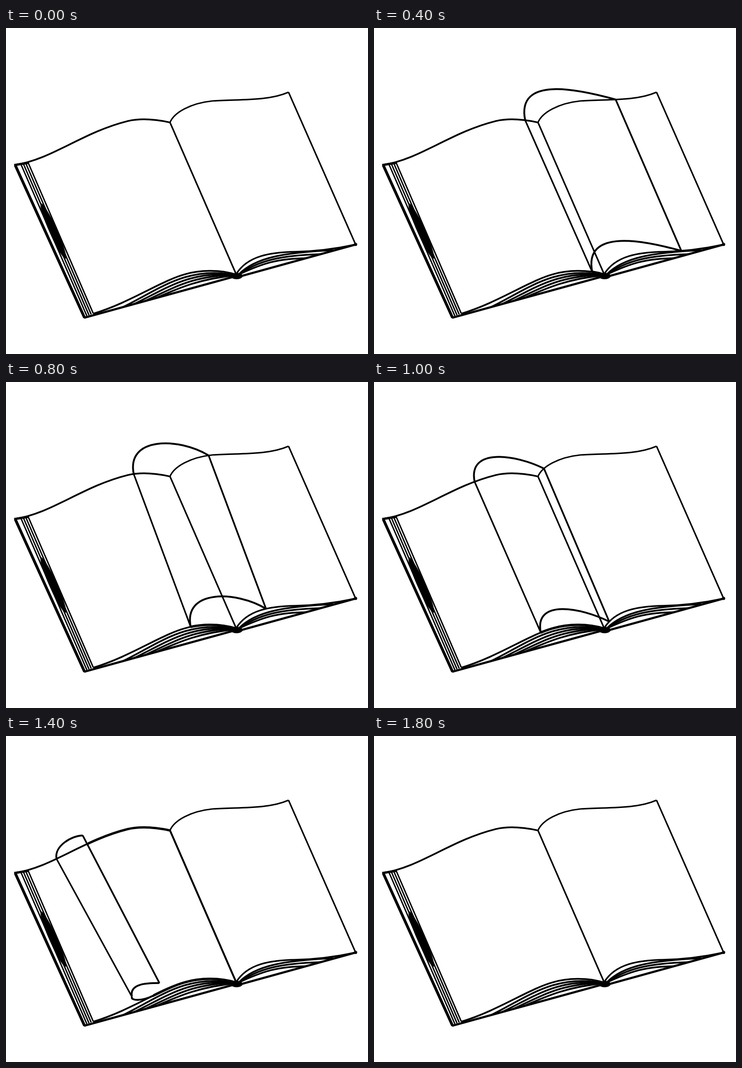
Recreate the animation shown at these times as an HTML page with a canvas. Size 788 by 711 pixels, loop 1900 ms.

```html
<!DOCTYPE html>
<html lang="en">
<head>
<meta charset="utf-8">
<title>Turning page</title>
<style>
  html, body { margin: 0; width: 100%; height: 100%; overflow: hidden; background: #fff; }
  canvas { display: block; }
</style>
</head>
<body>
<canvas id="stage" width="788" height="711"></canvas>
<script>
const ctx = document.getElementById('stage').getContext('2d');
const LOOP = 1900, STEP = 100, TURN = 1800;

// Page outlines as chained cubics: anchor, two controls, anchor, ...
const leftTop = [[18, 299], [100, 287], [165, 228], [265, 203], [295, 196], [325, 199], [357, 206]];
const rightTop = [[357, 206], [366, 184], [402, 164], [450, 159], [505, 155], [570, 160], [615, 140]];
const leftBottom = [[190, 623], [270, 599], [338, 551], [390, 537], [420, 528], [465, 526], [501, 538]];
const rightBottom = [[501, 537], [525, 497], [575, 489], [630, 488], [680, 487], [725, 480], [762, 472]];

// Horizontal travel of the fold and the free corner; heights follow the outlines.
const keyTimes = [0, 400, 800, 1000, 1200, 1400, TURN];
const topEdge = {
  left: leftTop, right: rightTop,
  fold: [357, 329, 278, 219, 157, 110, 48],
  corner: [615, 526, 441, 370, 272, 167, 48]
};
const bottomEdge = {
  left: leftBottom, right: rightBottom,
  fold: [501, 475, 402, 363, 310, 274, 190],
  corner: [762, 669, 566, 512, 417, 334, 190]
};

const clamp = v => Math.min(1, Math.max(0, v));
const shift = ([x, y], dx, dy) => [x + dx, y + dy];
const baseLeft = x => 632 - (x - 170) * 0.275;
const baseRight = x => 541 - (x - 514) * 0.278;

function track(values, t) {
  const i = keyTimes.findIndex(end => end > t) - 1;
  const u = (t - keyTimes[i]) / (keyTimes[i + 1] - keyTimes[i]);
  return values[i] + (values[i + 1] - values[i]) * u;
}

function cubic(a, b, c, d, u) {
  const v = 1 - u;
  return v * v * v * a + 3 * v * v * u * b + 3 * v * u * u * c + u * u * u * d;
}

function heightAt(curve, x) {
  const start = x < curve[3][0] ? 0 : 3;
  const axis = n => curve.slice(start, start + 4).map(p => p[n]);
  const xs = axis(0);
  let low = 0, high = 1;
  for (let i = 0; i < 20; i++) {
    const mid = (low + high) / 2;
    if (cubic(...xs, mid) < x) low = mid;
    else high = mid;
  }
  return cubic(...axis(1), low);
}

function curve(points, width) {
  ctx.beginPath();
  ctx.moveTo(...points[0]);
  for (let i = 1; i < points.length; i += 3) {
    ctx.bezierCurveTo(...points[i], ...points[i + 1], ...points[i + 2]);
  }
  ctx.lineWidth = width;
  ctx.stroke();
}

function line(a, b, width) {
  curve([a, a, b, b], width);
}

function curveRightOf(x, points, width) {
  ctx.save();
  ctx.beginPath();
  ctx.rect(x, 0, 788, 711);
  ctx.clip();
  curve(points, width);
  ctx.restore();
}

function blob(x, y, rx, ry, angle = 0) {
  ctx.beginPath();
  ctx.ellipse(x, y, rx, ry, angle, 0, 2 * Math.PI);
  ctx.fill();
}

function drawBook() {
  curve(leftTop, 3.8);
  curve(rightTop, 3.2);
  line([615, 140], [761, 472], 3.2);
  line([357, 206], [501, 537], 3.3);

  line([20, 299], [171, 632], 6);
  line([18, 299], [48, 294], 5);
  for (let k = 0; k < 4; k++) {
    line([32 + 5.3 * k, 296 - k], [176 + 4.7 * k, 628 - 1.7 * k], 3);
  }
  blob(103, 443, 66, 8.5, Math.atan2(332, 148));

  line([170, 632], [501, 541], 4.6);
  line([505, 543], [762, 472], 4.6);
  curve(leftBottom, 3.8);
  curve(rightBottom, 3.6);
  for (let k = 1; k < 5; k++) {
    const start = 230 + 24 * k, bend = 320 + 14 * k;
    curve([[start, baseLeft(start)], [bend, baseLeft(bend) - 20 + 3 * k],
      [385 + 8 * k, 508 + 10 * k], [501, 539]], 3.8);
  }
  for (let k = 1; k < 4; k++) {
    const end = 750 - 32 * k;
    curve([[506, 538], [535 + 8 * k, 492 + 7 * k], [620 - 10 * k, 482 + 7 * k],
      [end, baseRight(end)]], 3.8);
  }
  blob(502, 541, 13, 7);
  blob(761, 472, 3.5, 3.5);
}

// One edge of the turning page, from its fold over the curl to the free corner.
function edgeAt(edge, t, foldLift, cornerLift) {
  const foldX = track(edge.fold, t), cornerX = track(edge.corner, t);
  const onRight = cornerX > edge.right[0][0];
  const fold = [foldX, heightAt(edge.left, foldX) - foldLift];
  const corner = [cornerX, heightAt(onRight ? edge.right : edge.left, cornerX) - cornerLift];
  const width = cornerX - foldX;
  const rise = clamp(t / 400);
  const tilt = 40 * Math.sin(Math.PI * clamp((t - 200) / 1100));
  return [fold, shift(fold, -0.1 * width * rise, -0.5 * width * rise),
    shift(corner, -0.4 * width, -tilt), corner];
}

function drawPage(t) {
  const lift = 29 * Math.sin(Math.PI * Math.sqrt(clamp((t - 1000) / 800)));
  const top = edgeAt(topEdge, t, 0, lift);
  const bottom = edgeAt(bottomEdge, t, lift * 0.9, lift * 0.9);
  curve(top, 4);
  curve(bottom, 4);
  line(top[0], bottom[0], 3.4);
  line(top[3], bottom[3], 3.7);

  let joinX = bottom[0][0];
  if (lift > 0) {
    joinX += 2 * lift;
    curve([bottom[0], shift(bottom[0], -3, 10), shift(bottom[0], 24, 9),
      [joinX, heightAt(leftBottom, joinX)]], 4);
    line([357, 206], [501, 537], 4);
  }
  curveRightOf(joinX, leftBottom, 5.4);
  curveRightOf(top[3][0] + 11, leftTop, 5.2);
}

function frame(now) {
  const t = Math.floor(now % LOOP / STEP) * STEP;
  ctx.fillStyle = '#fff';
  ctx.fillRect(0, 0, 788, 711);
  ctx.fillStyle = ctx.strokeStyle = '#000';
  ctx.lineJoin = 'round';
  drawBook();
  if (t > 0 && t < TURN) drawPage(t);
  requestAnimationFrame(frame);
}

requestAnimationFrame(frame);
</script>
</body>
</html>
```
